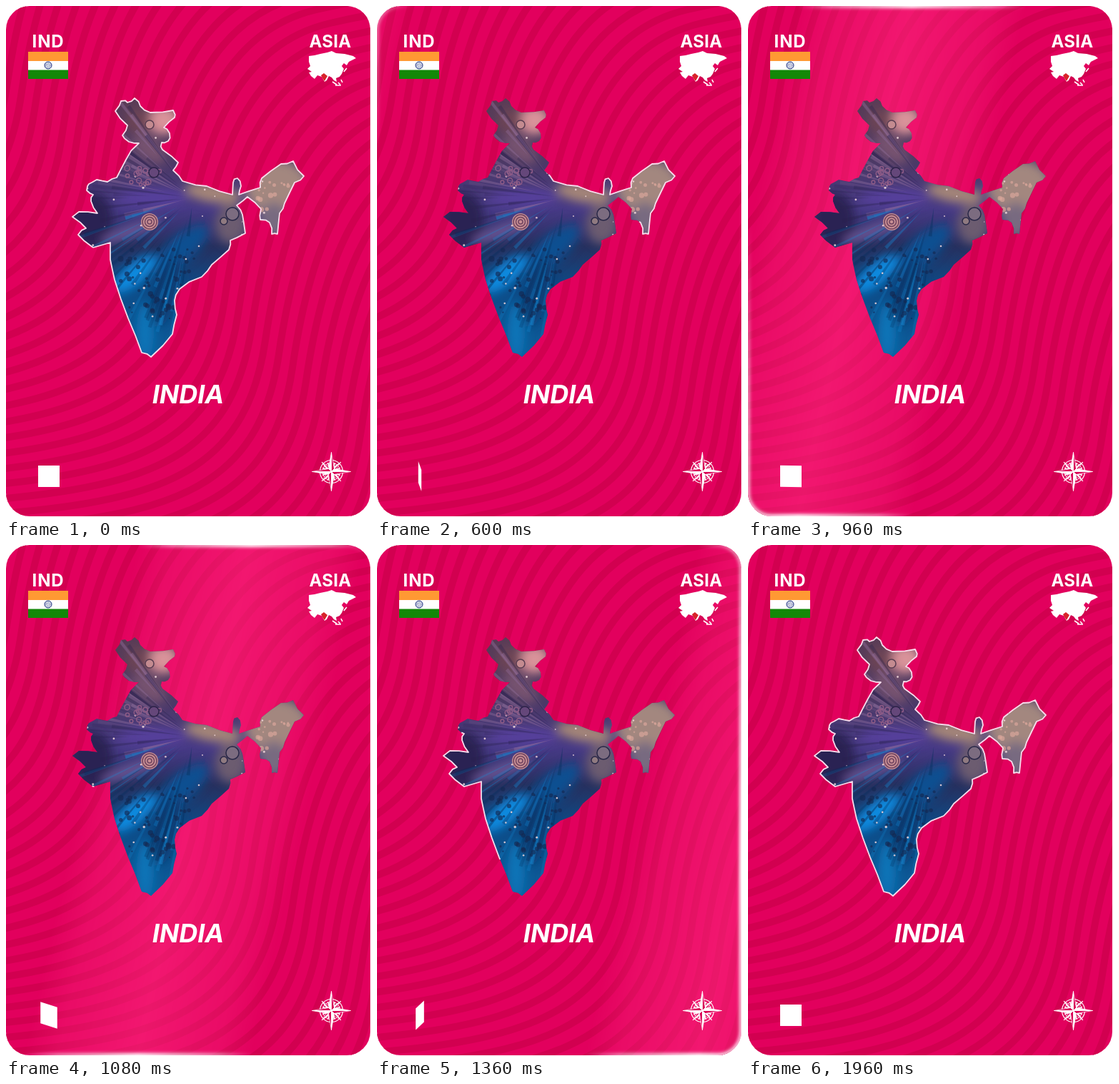
An HTML page for the animation above (2000 ms loop, 511 px wide and 715 px high).

```html
<!DOCTYPE html>
<html lang="en">
<head>
<meta charset="utf-8">
<title>India card</title>
<style>
  html, body { margin: 0; width: 100%; height: 100%; overflow: hidden; background: #fff; }
  svg { display: block; }
  text { font-family: Montserrat, Inter, "Open Sans", sans-serif; font-weight: 700; fill: #fff; text-anchor: middle; }
</style>
</head>
<body>
<svg width="511" height="715" viewBox="0 0 511 715">
  <defs>
    <clipPath id="card"><rect width="510" height="714" rx="33"/></clipPath>
    <clipPath id="land"><path class="land"/></clipPath>
    <linearGradient id="glow">
      <stop offset="0" stop-color="#fff" stop-opacity="0"/>
      <stop offset=".15" stop-color="#fff" stop-opacity=".5"/>
      <stop offset=".5" stop-color="#fff"/>
      <stop offset=".85" stop-color="#fff" stop-opacity=".5"/>
      <stop offset="1" stop-color="#fff" stop-opacity="0"/>
    </linearGradient>
    <linearGradient id="paint" x2="0" y2="1">
      <stop offset="0" stop-color="#5a3c55"/>
      <stop offset=".25" stop-color="#4d3a66"/>
      <stop offset=".43" stop-color="#473a86"/>
      <stop offset=".57" stop-color="#27305f"/>
      <stop offset=".72" stop-color="#0d4a86"/>
      <stop offset="1" stop-color="#0d5f9d"/>
    </linearGradient>
    <filter id="soft" x="-50%" y="-50%" width="200%" height="200%"><feGaussianBlur stdDeviation="7"/></filter>
    <filter id="edge"><feGaussianBlur stdDeviation="2"/></filter>
    <mask id="beamMask" maskUnits="userSpaceOnUse" x="0" y="0" width="511" height="715">
      <g id="beam"><rect width="320" height="715" fill="url(#glow)" transform="skewX(-12.6)"/></g>
    </mask>
  </defs>

  <g clip-path="url(#card)">
    <rect width="511" height="715" fill="#e2005d"/>
    <g id="stripes" fill="none" stroke="#d20050" stroke-width="10"></g>
    <g mask="url(#beamMask)">
      <rect width="511" height="715" fill="#ff2a80" opacity=".55"/>
      <rect width="510" height="714" rx="33" fill="none" stroke="#fff" stroke-width="6" filter="url(#edge)"/>
    </g>
  </g>

  <g clip-path="url(#land)">
    <rect x="90" y="125" width="330" height="370" fill="url(#paint)"/>
    <g id="tones" filter="url(#soft)"></g>
    <g id="rays"></g>
    <g id="dots"></g>
  </g>
  <path id="outline" class="land" fill="none" stroke="#f8dcec" stroke-width="1.8" stroke-linejoin="round" pathLength="1"/>

  <text x="59" y="58" font-size="24" letter-spacing=".8">IND</text>
  <text x="454" y="58" font-size="24" letter-spacing=".3">ASIA</text>
  <text x="255" y="556" font-size="36" font-style="italic">INDIA</text>

  <rect x="31" y="64" width="56" height="13" fill="#ff9933"/>
  <rect x="31" y="77" width="56" height="13" fill="#fff"/>
  <rect x="31" y="89.5" width="56" height="12.5" fill="#138808"/>
  <g fill="none" stroke="#1c2f80">
    <circle cx="59" cy="83" r="5"/>
    <circle cx="59" cy="83" r="2.6" stroke-width="4" stroke-dasharray=".5 .86" opacity=".7"/>
  </g>

  <g fill="#fff">
    <path d="M424 70L432 69 440 67 450 65 456 63 462 66 474 67 486 70 490 73 484 76 480 78 477 83 473 80 470 84 473 88 470 95 467 99 462 101 463 106 459 104 456 100 452 98 449 104 446 106 442 99 436 97 432 102 427 98 424 93 428 92 422 88 426 84 424 78Z"/>
    <path d="M457 106l6 4M465 107l3 3M473 92l4-5M469 103l2 4M461 111h8" stroke="#fff" stroke-width="1.6"/>
    <path d="M441 97l4-3 5 4-4 7-3-4z" fill="#d8232a"/>
  </g>

  <g id="compass" transform="translate(455.5 651.5)" stroke="#fff">
    <circle r="16" fill="none" stroke-width="1.2"/>
    <circle r="12.5" fill="none" stroke-width=".8"/>
  </g>

  <g transform="translate(60 658)">
    <rect id="mark" x="-15" y="-15" width="30" height="30" fill="#fff"/>
  </g>
</svg>
<script>
const $ = id => document.getElementById(id);

let seed = 11;
const rnd = () => (seed = seed * 16807 % 2147483647) / 2147483647;
const span = (a, b) => a + (b - a) * rnd();

function add(parent, tag, attrs) {
  const el = document.createElementNS('http://www.w3.org/2000/svg', tag);
  for (const k in attrs) el.setAttribute(k, attrs[k]);
  parent.append(el);
}

// One S-curve repeated along the diagonal.
for (let i = -32; i < 24; i++)
  add($('stripes'), 'path', {
    d: 'M-400 700C-200 690-100 680-20 670C200 650 300 600 325 430S400 130 530 100S800 60 1000 50',
    transform: `translate(${i * 19} ${i * 19})`
  });

// Border, roughened by a jittered midpoint on every side.
const border = `122,338 101,320 112,311 93,295 102,288 128,290 119,273 122,264 113,258 116,249
 127,243 142,246 155,240 168,215 186,192 172,190 163,181 170,167 153,147 161,133 170,135 180,129
 188,140 202,149 234,146 236,156 221,170 229,178 227,189 218,191 219,201 241,219 234,230 247,245
 281,252 317,264 318,247 324,241 329,252 326,264 356,254 358,241 385,221 402,217 417,238 404,247
 390,276 383,290 380,319 372,319 369,303 356,299 357,284 338,267 323,279 331,292 335,318 314,328
 312,341 288,362 274,379 243,396 236,412 239,432 233,459 203,491 190,485 171,437 152,383 146,355
 146,331`.split(/\s+/).map(p => p.split(',').map(Number));
const rough = border.flatMap((p, i) => {
  const q = border[(i + 1) % border.length];
  return [p, [0, 1].map(k => ((p[k] + q[k]) / 2 + span(-1.8, 1.8)).toFixed(1))];
});
document.querySelectorAll('.land').forEach(el => el.setAttribute('d', 'M' + rough.join('L') + 'Z'));

// Soft patches of colour: x, y, rx, ry, turn, fill
[
  [220, 160, 22, 20, 0, '#d9939a'],
  [185, 160, 18, 18, 0, '#6d4455'],
  [200, 200, 28, 14, 40, '#77536f'],
  [120, 300, 30, 40, 0, '#2c2453'],
  [205, 268, 50, 12, 0, '#56409c'],
  [175, 315, 45, 8, -20, '#6d5796'],
  [290, 262, 40, 13, 10, '#a58678'],
  [315, 305, 22, 28, 0, '#6c5b70'],
  [380, 255, 45, 40, 0, '#a3877f'],
  [375, 300, 20, 25, 0, '#786a80'],
  [180, 375, 38, 14, -40, '#0a8be0'],
  [245, 340, 48, 18, -40, '#114f91'],
  [225, 400, 16, 50, 15, '#0f3d74'],
  [195, 455, 12, 40, 0, '#0c74b8']
].forEach(([x, y, rx, ry, turn, fill]) =>
  add($('tones'), 'ellipse', { rx, ry, fill, transform: `translate(${x} ${y}) rotate(${turn})` }));

// Streaks fanning out from the middle
for (let i = 0; i < 70; i++) {
  const turn = span(95, 235), lower = turn < 165;
  const from = span(8, 90), to = from + span(40, 140);
  add($('rays'), 'path', {
    d: `M${from} 0L${to} -2.5V2.5Z`,
    fill: rnd() < .5 ? (lower ? '#07315f' : '#2b2350') : (lower ? '#1590dc' : '#94719f'),
    opacity: span(.15, .45),
    transform: `translate(262 268) rotate(${turn})`
  });
}

const dot = (x, y, r, fill, opacity = 1) => add($('dots'), 'circle', { cx: x, cy: y, r, fill, opacity });
const ring = (x, y, r, stroke, fill = 'none') =>
  add($('dots'), 'circle', { cx: x, cy: y, r, stroke, fill, 'stroke-width': 1.5 });

for (let i = 0; i < 65; i++) dot(span(150, 275), span(335, 440), span(1, 4), '#142852', .65);
for (let i = 0; i < 75; i++) dot(span(100, 410), span(130, 490), span(.6, 1.8), '#f3d9dc', .85);
for (let i = 0; i < 22; i++) dot(span(345, 400), span(240, 285), span(1, 4), '#d9a69b', .7);
for (let i = 0; i < 16; i++) ring(span(168, 215), span(225, 252), span(2, 4), '#8d5b86');
dot(201, 302, 12, '#c78f94');
[10, 6.5, 3].forEach(r => ring(201, 302, r, '#70435f'));
ring(207, 233, 7, '#2c2248', '#65477a');
ring(201, 166, 6, '#5a3d52', '#c48b90');
ring(317, 291, 9, '#2a2848', '#7c6c80');
ring(305, 301, 5, '#2a2848', '#8f7a80');

// Compass: long, medium and short points, each half filled
const point = (turn, len, w) => {
  const g = { transform: `rotate(${turn})`, 'stroke-width': .7 };
  add($('compass'), 'path', { ...g, d: `M0 ${-len}L${w} ${-w}L0 0Z`, fill: '#d90056' });
  add($('compass'), 'path', { ...g, d: `M0 ${-len}L${-w} ${-w}L0 0Z`, fill: '#fff' });
};
for (let i = 0; i < 8; i++) point(22.5 + i * 45, 13, 1.5);
for (let i = 0; i < 4; i++) point(45 + i * 90, 19, 3);
for (let i = 0; i < 4; i++) point(i * 90, 27, 4);

const cubic = u => u < .5 ? 4 * u ** 3 : 1 - 4 * (1 - u) ** 3;

function draw(now) {
  const t = Math.floor(now % 2000 / 40) * 40;

  $('beam').setAttribute('transform', `translate(${(t - 760) * .95 - 120})`);

  // Outline is erased, then regrown, both ways round from the west coast.
  const part = cubic(t % 1000 / 1000) / 2;
  $('outline').setAttribute('stroke-dasharray',
    t < 1000 ? `0 ${part} ${1 - 2 * part} ${part + 1}` : `${part} ${1 - 2 * part} ${part} 1`);

  const turn = Math.PI * (1 - Math.cos(Math.PI * Math.min(1, t / 1900)));
  $('mark').setAttribute('transform', `matrix(${Math.cos(turn)} ${.4 * Math.sin(turn)} 0 1 0 0)`);

  requestAnimationFrame(draw);
}
requestAnimationFrame(draw);
</script>
</body>
</html>
```
